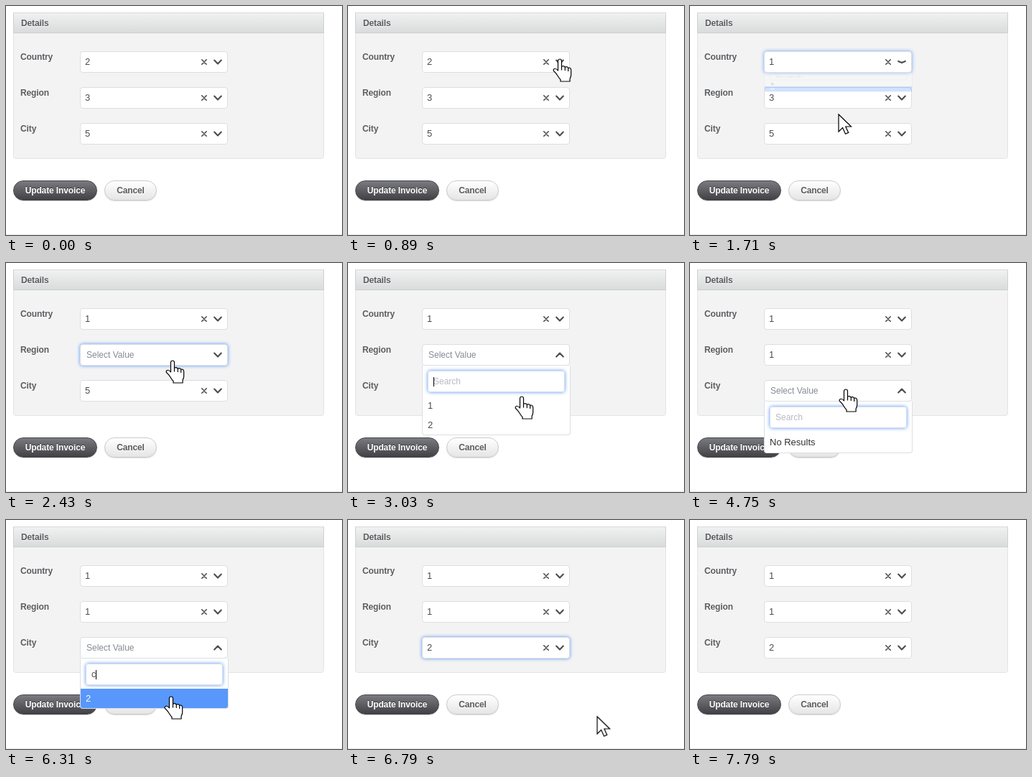
Write an HTML page that moves like this. It is 468 px wide and 319 px high and loops after 8.37 s.

```html
<!DOCTYPE html>
<html lang="en">
<head>
<meta charset="utf-8">
<title>Dependent dropdowns</title>
<style>
html, body { margin: 0; width: 100%; height: 100%; overflow: hidden; background: #fff; }
body { position: relative; font: 13px "Liberation Sans", Arial, sans-serif; color: #4d4d4d; }
body * { box-sizing: border-box; }
div, span, svg, i { position: absolute; white-space: nowrap; }
.card { left: 10px; top: 9px; width: 433px; height: 204px; background: #f3f3f3; border: 1px solid #e2e3e4; border-radius: 0 0 4px 4px; }
.head { left: -1px; top: -1px; width: 433px; height: 29px; border: 1px solid #cdcfd0; border-top-color: #d8dada; background: linear-gradient(#f0f1f1, #d9dcdc); }
.head, .label, .button { font-weight: bold; font-size: 12px; letter-spacing: -.12px; color: #5a5c5f; text-shadow: 0 1px #fff; }
.head { line-height: 28px; padding-left: 10px; }
.label { left: 20px; line-height: 16px; }
.button { top: 243px; height: 28px; line-height: 26px; border-radius: 14px; text-align: center; box-shadow: 0 1px 1px #0002; }
.update { left: 10px; width: 117px; color: #fff; text-shadow: 0 -1px #333; border: 1px solid #48484c; background: linear-gradient(#7a7b80, #414045); }
.cancel { left: 137px; width: 73px; border: 1px solid #cacaca; background: linear-gradient(#fff, #e5e5e5); }
.rule { left: 0; top: 318px; width: 100%; height: 1px; background: #e8e8eb; }
.control { left: 103px; width: 206px; height: 30px; background: #fff; border: 1px solid #dcdee2; border-radius: 4px; line-height: 28px; }
.control span { left: 6px; }
.control .empty { left: 8px; font-size: 12px; color: #858a93; }
svg { overflow: visible; fill: none; stroke: #4d4d4d; stroke-linecap: round; stroke-linejoin: round; }
.clear { left: 168px; top: 10px; width: 8px; height: 8px; stroke-width: 20; }
.arrow { left: 185px; top: 8px; width: 12px; height: 12px; stroke-width: 18; }
.panel { left: 103px; width: 207px; z-index: 2; background: #fff; border: 1px solid #dcdee2; border-top: 0; border-radius: 0 0 4px 4px; transform-origin: top; overflow: hidden; }
.search { left: 7px; top: 7px; width: 191px; height: 30px; border: 1px solid #d3dcec; border-radius: 4px; line-height: 28px; font-size: 12px; }
.search span { left: 7px; }
.hint { color: #b9bac4; }
.caret { top: 8px; width: 1px; height: 13px; background: #000; }
.option { left: 0; width: 205px; height: 27px; line-height: 27px; padding-left: 7px; }
.picked { background: #5897fb; color: #fff; }
.cursor { z-index: 3; left: 0; top: 0; width: 1px; height: 1px; fill: #fff; stroke: #000; stroke-width: 1.2; }
</style>
</head>
<body>
<div class="card"><div class="head">Details</div></div>
<div class="button update">Update Invoice</div>
<div class="button cancel">Cancel</div>
<div class="rule"></div>
<svg class="cursor">
  <path class="pointer" stroke-linejoin="miter" d="M0 0V24l5.6-5.4 3.9 8.6 4.2-1.8-3.9-8.4H17.5z"/>
  <path class="hand" d="M-2.5 2.5a2.5 2.5 0 0 1 5 0V11q0-1.5 2.4-1.3 2.2.2 2.4 2 .3-1.4 2.4-1 2 .4 2 2 .4-1 2-.6 2 .5 2 3V22q0 2.5-1.6 5V31H1V28.5q-2-2-4-5.5-1.5-3-5.5-6.5-1-2 .8-3 2.2-1 5.2 2.3zM2.5 10v5M7.3 11.5v4M11.7 12.5v4"/>
</svg>
<script>
const LOOP = 8370, SLIDE = 200;
const HOLD = 'steps(1, end)';

// Stops are [time in ms, value]; the end values are held to the loop's edges.
function track(el, prop, stops, easing = 'linear') {
  const all = [[0, stops[0][1]], ...stops, [LOOP, stops.at(-1)[1]]];
  el.animate(all.map(([time, value]) => ({ offset: time / LOOP, [prop]: value, easing })),
    { duration: LOOP, iterations: Infinity });
}

function show(el, ...spans) {
  track(el, 'opacity', [[0, 0], ...spans.flatMap(([from, to]) => [[from, 1], [to, 0]])], HOLD);
}

function glow(el, ...spans) {
  const off = '0 0 5px #5897fb00', on = '0 0 5px #5897fb';
  track(el, 'boxShadow', [[0, off], ...spans.flatMap(([from, to, fade = 100]) =>
    [[from, off], [from + 100, on], [to, on], [to + fade, off]])]);
}

function slide(el, prop, [open, close], shut, wide) {
  track(el, prop, [[open, shut], [open + SLIDE, wide], [close, wide], [close + SLIDE, shut]], 'ease');
}

function add(parent, cls, text = '', style = {}, tag = 'div') {
  const el = document.createElement(tag);
  el.className = cls;
  el.textContent = text;
  Object.assign(el.style, style);
  parent.append(el);
  return el;
}

function icon(parent, cls, d) {
  parent.insertAdjacentHTML('beforeend', `<svg class="${cls}" viewBox="0 0 100 100"><path d="${d}"/></svg>`);
  return parent.lastElementChild;
}

const EMPTY = 'Select Value';
const fields = [
  { label: 'Country', open: [1070, 1625], focus: [[930, 1070], [1625, 2320]], height: 97,
    values: [['2', 0, 1625], ['1', 1625, LOOP]],
    options: [{ text: '1', hover: [1400, 1630] }, { text: '2', picked: true }],
    carets: [[8, 1070, 1600]] },
  { label: 'Region', open: [2570, 3350], focus: [[2320, 2570], [3350, 4030]], height: 97,
    values: [['3', 0, 2030], [EMPTY, 2030, 3350], ['1', 3350, LOOP]],
    options: [{ text: '1', hover: [3100, 3420] }, { text: '2' }],
    carets: [[8, 2570, 3100]] },
  { label: 'City', open: [4230, 6370], focus: [[4060, 4230], [6370, 7790, 0]], height: 72,
    values: [['5', 0, 3700], [EMPTY, 3700, 6370], ['2', 6370, LOOP]],
    options: [{ text: '2', span: [4980, LOOP], hover: [6300, LOOP] }],
    carets: [[8, 4230, 4750], [14, 4830, 5320], [14, 5850, 6370]],
    typed: 4830, found: 4980 }
];

function buildControl(field, top) {
  const control = add(document.body, 'control', '', { top: top + 'px' });
  const clear = icon(control, 'clear', 'M10 10L90 90M10 90L90 10');
  const arrow = icon(control, 'arrow', 'M10 30L50 70L90 30').firstChild;
  for (const [text, from, to] of field.values)
    show(add(control, text === EMPTY ? 'empty' : '', text, {}, 'span'), [from, to]);
  show(clear, ...field.values.filter(([text]) => text !== EMPTY).map(([, from, to]) => [from, to]));
  slide(arrow, 'd', field.open, 'path("M10 30L50 70L90 30")', 'path("M10 70L50 30L90 70")');
  glow(control, ...field.focus);
}

function buildPanel(field, top) {
  const panel = add(document.body, 'panel', '', { top: top + 'px', height: field.height + 'px' });
  slide(panel, 'transform', field.open, 'scaleY(0)', 'scaleY(1)');
  slide(panel, 'opacity', field.open, 0, 1);

  const search = add(panel, 'search');
  glow(search, field.open);
  show(add(search, 'hint', 'Search', {}, 'span'), [0, field.typed ?? LOOP]);
  for (const [x, from, to] of field.carets)
    show(add(search, 'caret', '', { left: x - 1 + 'px' }, 'i'), [from, to]);

  field.options.forEach(({ text, picked, hover, span }, row) => {
    const style = { top: 42 + row * 27 + 'px' };
    const option = add(panel, picked ? 'option picked' : 'option', text, style);
    if (span) show(option, span);
    if (hover) show(add(panel, 'option picked', text, style), hover);
  });

  if (field.typed) {
    show(add(search, '', 'c', {}, 'span'), [field.typed, LOOP]);
    show(add(panel, 'option', 'No Results', { top: '43px', color: '#333' }), [0, field.found]);
    track(panel, 'height', [[0, '72px'], [field.found, '70px']], HOLD);
  }
}

fields.forEach((field, i) => {
  const top = 63 + i * 50;
  add(document.body, 'label', field.label, { top: top + 'px' });
  buildControl(field, top);
  buildPanel(field, top + 30);
});

const cursor = document.querySelector('.cursor');
const path = [
  [170, 414, 275], [410, 345, 140], [680, 300, 57], [890, 295, 74], [1090, 294, 76],
  [1450, 207, 151], [1930, 207, 151], [2350, 232, 136], [2850, 232, 136], [3030, 242, 186],
  [3190, 240, 205], [3480, 240, 205], [4000, 222, 158], [4150, 220, 160], [4320, 217, 176],
  [5680, 217, 176], [6140, 225, 225], [6300, 230, 246], [6430, 230, 246], [7130, 457, 300],
  [7280, 472, 322]
];
track(cursor, 'transform', path.map(([time, x, y]) => [time, `translate(${x}px, ${y}px)`]));
show(cursor, [170, 7280]);
show(cursor.querySelector('.hand'), [780, 1640], [2170, 3450], [3700, 3980], [4180, 6430]);
show(cursor.querySelector('.pointer'), [0, 780], [1640, 2170], [3450, 3700], [3980, 4180], [6430, LOOP]);
</script>
</body>
</html>
```
